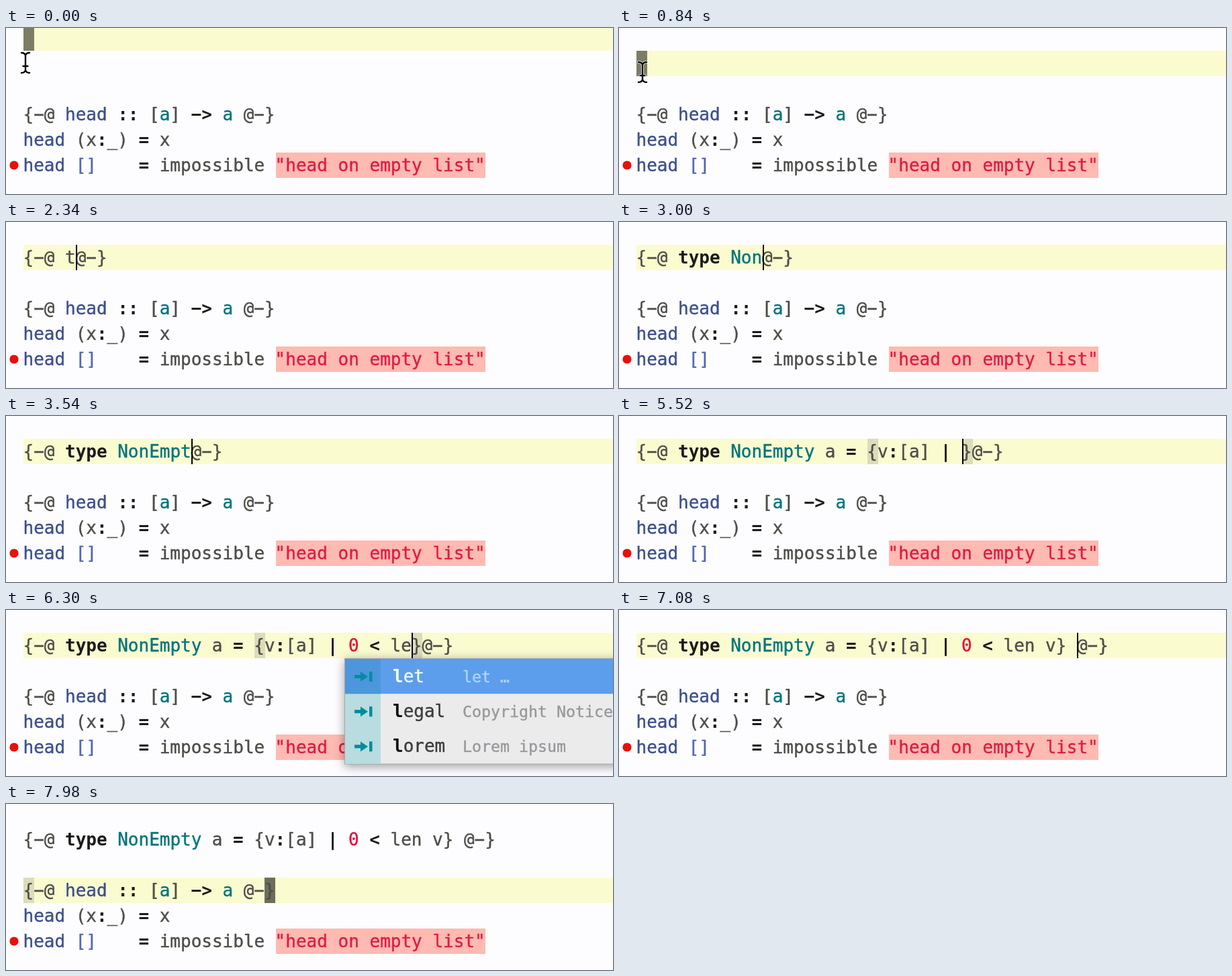
Write an HTML page with a canvas that moves like this. It is 904 px wide and 248 px high and loops after 8000 ms.

```html
<!DOCTYPE html>
<html lang="en">
<head>
<meta charset="utf-8">
<title>Editing a refinement type</title>
<style>
  html, body { margin: 0; width: 100%; height: 100%; overflow: hidden; background: #fdfdff; }
  canvas { display: block; }
</style>
</head>
<body>
<canvas id="stage" width="904" height="248"></canvas>
<script>
const ctx = document.getElementById('stage').getContext('2d');
const LOOP = 8000, TICK = 60;
const LEFT = 26, SIZE = 26, CELL = 15.63, LINE = 38;
const FAMILY = '"DejaVu Sans Mono", monospace';
const COLOR = {
  page: '#fdfdff', line: '#fbfbd0', text: '#4d4d48', name: '#3d4f8c', empty: '#5468b4',
  strong: '#1b1b18', type: '#00747c', number: '#e0143c', string: '#de1c44', stringBg: '#ffbab2',
  pair: '#dcdcba', block: 'rgba(0, 0, 0, 0.5)', dot: '#e8100a'
};
const SIGNATURE = '{-@ head :: [a] -> a @-}';
const PAIRS = { '{': '}', '[': ']' };

const rect = (x, y, w, h, color) => {
  ctx.fillStyle = color;
  ctx.fillRect(x, y, w, h);
};
const colX = col => Math.round(LEFT + col * CELL);

// A hairline stroke gives the text the weight of smoothed screen type.
function label(text, x, y, color, bold = false, size = SIZE) {
  const shown = text.replace(/-/g, '\u2212');
  ctx.font = `${bold ? 'bold ' : ''}${size}px ${FAMILY}`;
  ctx.fillStyle = ctx.strokeStyle = color;
  ctx.lineWidth = 0.4;
  ctx.lineJoin = 'round';
  ctx.fillText(shown, x, y);
  if (!bold) ctx.strokeText(shown, x, y);
}

// Each edit types text before the caret; tail replaces what follows the caret.
const steps = [{ at: 0, left: '', right: '' }];
function type(from, to, text, tail) {
  [...text].forEach((ch, i) => {
    const last = steps[steps.length - 1];
    steps.push({
      at: from + (to - from) * i / Math.max(1, text.length - 1),
      left: last.left + ch,
      right: tail === undefined ? last.right : tail
    });
  });
}
const press = (at, ch, tail) => type(at, at, ch, tail);

press(1320, '{', '}');
press(1500, '-', '-}');
press(1680, '@', '@-}');
press(1900, ' ');
type(2320, 2980, 'type Non');
type(3080, 4290, 'Empty a = ');
press(4400, '{', '}@-}');
type(4560, 4740, 'v:');
press(4880, '[', ']}@-}');
press(5000, 'a');
press(5130, ']', '}@-}');
type(5260, 6270, ' | 0 < le');
type(6400, 6700, 'n v');
press(6880, '}', '@-}');
press(7000, ' ');

function style(token, text, at) {
  if (/^(type|::|->|[=|<:])$/.test(token)) return [COLOR.strong, true];
  if (/^[A-Z]/.test(token)) return [COLOR.type];
  if (/^\d/.test(token)) return [COLOR.number];
  if (token[0] === '"') return [COLOR.string];
  if (token === 'head') return [COLOR.name];
  if (token === '[]') return [COLOR.empty];
  if (token === 'a' && text.lastIndexOf('::', at) >= 0) return [COLOR.type];
  return [COLOR.text];
}

function code(text, top) {
  for (const m of text.matchAll(/"[^"]*"|\w+|::|->|\[\]|\S/g)) {
    const [color, bold] = style(m[0], text, m.index);
    label(m[0], LEFT - 0.5 + m.index * CELL, top + 28, color, bold);
  }
}

function matching(text, at) {
  const ch = text[at];
  const opens = ch in PAIRS;
  const other = opens ? PAIRS[ch] : Object.keys(PAIRS).find(k => PAIRS[k] === ch);
  if (!ch || !other) return -1;
  const dir = opens ? 1 : -1;
  for (let i = at, depth = 0; i >= 0 && i < text.length; i += dir) {
    if (text[i] === ch) depth++;
    if (text[i] === other && --depth === 0) return i;
  }
  return -1;
}

function highlightPair(text, spots, top) {
  for (const at of spots) {
    const mate = matching(text, at);
    if (mate < 0) continue;
    for (const col of [at, mate]) rect(colX(col), top, 16, LINE, COLOR.pair);
    return;
  }
}

function caretState(t, left) {
  if (t < 420) return { top: -4, col: 0, block: true };
  if (t < 1100) return { top: 34, col: 0, block: true };
  if (t < 7260) return { top: 34, col: left.length, block: false };
  if (t < 7620) return { top: 34, col: left.length - 1, block: true };
  if (t < 7800) return { top: 72, col: 0, block: true };
  return { top: 110, col: SIGNATURE.length - 1, block: true };
}

function pointer(t) {
  const p = Math.min(1, Math.max(0, (t - 300) / 420));
  const ease = p * p * (3 - 2 * p);
  ctx.save();
  ctx.translate(29 + 6 * ease, 52 + 14 * ease);
  ctx.beginPath();
  for (const s of [-1, 1]) {
    ctx.moveTo(-6, s * 15);
    ctx.quadraticCurveTo(-1, s * 15, 0, s * 11);
    ctx.quadraticCurveTo(1, s * 15, 6, s * 15);
  }
  ctx.moveTo(0, -11);
  ctx.lineTo(0, 11);
  ctx.moveTo(-3.5, 5);
  ctx.lineTo(3.5, 5);
  ctx.lineCap = 'round';
  for (const [width, color] of [[4, '#fff'], [2.4, '#000']]) {
    ctx.lineWidth = width;
    ctx.strokeStyle = color;
    ctx.stroke();
  }
  ctx.restore();
}

function arrow(y, color) {
  rect(519, y - 2.5, 11, 5, color);
  ctx.beginPath();
  ctx.moveTo(528, y - 7.5);
  ctx.lineTo(539, y);
  ctx.lineTo(528, y + 7.5);
  ctx.fill();
  rect(541, y - 7.5, 4.5, 15, color);
}

function popup() {
  const x = 505, top = 73, row = 52.2;
  ctx.save();
  ctx.shadowColor = 'rgba(0, 0, 0, 0.38)';
  ctx.shadowBlur = 14;
  ctx.shadowOffsetY = 3;
  rect(x - 1, top - 1, 440, row * 3 + 2, '#a8a8aa');
  ctx.restore();
  rect(x, top, 440, row * 3, '#ebebec');
  rect(x, top, 53, row * 3, '#b8dcdf');
  rect(x, top, 440, row, '#5c9eec');
  rect(x, top, 53, row, '#4c96dc');
  [['let', 'let …'], ['legal', 'Copyright Notice'], ['lorem', 'Lorem ipsum']].forEach(([word, note], i) => {
    const y = top + row * i, on = i === 0;
    arrow(y + 26.5, on ? '#078aa6' : '#008c9c');
    label(word[0], 576, y + 35, on ? '#fff' : '#111', true);
    label(word.slice(1), 576 + CELL, y + 35, on ? '#f2f7fd' : '#3c3c3c');
    label(note, 680, y + 35, on ? '#b4d3f6' : '#98989a', false, 23.25);
  });
}

function draw(t) {
  const { left, right } = steps.findLast(s => s.at <= t);
  const edited = left + right;
  const caret = caretState(t, left);
  const x = colX(caret.col);

  rect(0, 0, 904, 248, COLOR.page);
  rect(LEFT, caret.top, 904 - LEFT, LINE, COLOR.line);
  const current = { 34: edited, 110: SIGNATURE }[caret.top] || '';
  const spots = caret.block ? [caret.col] : [caret.col, caret.col - 1];
  highlightPair(current, spots, caret.top);
  if (caret.block) rect(x, caret.top, 16, LINE, COLOR.block);

  rect(colX(24) + 1, 186, colX(44) - colX(24) - 1, LINE, COLOR.stringBg);
  code(edited, 34);
  code(SIGNATURE, 110);
  code('head (x:_) = x', 148);
  code('head []    = impossible "head on empty list"', 186);

  ctx.fillStyle = COLOR.dot;
  ctx.beginPath();
  ctx.arc(12, 205, 6.6, 0, Math.PI * 2);
  ctx.fill();

  if (!caret.block) rect(x, caret.top, 2, LINE, '#000');
  if (t >= 6200 && t < 6420) popup();
  if (t < 1320) pointer(t);
}

function frame() {
  const t = performance.now() % LOOP;
  draw(Math.floor(t / TICK) * TICK);
  requestAnimationFrame(frame);
}
frame();
</script>
</body>
</html>
```
